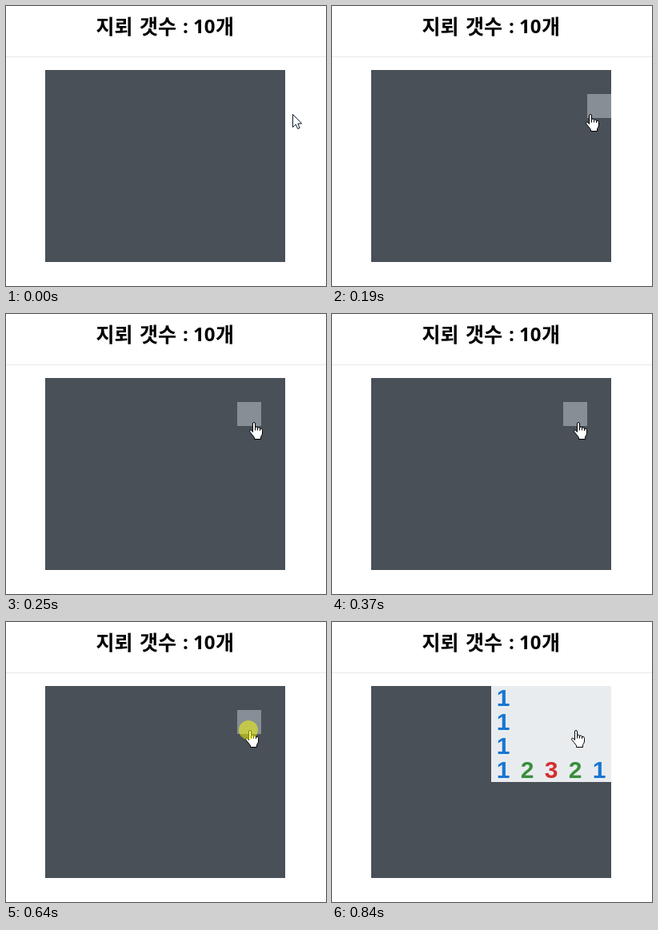
An HTML page with a canvas that plays this animation: 400x350 px, repeating every 1.1 s.

```html
<!DOCTYPE html>
<html lang="ko">
<head>
<meta charset="utf-8">
<style>
  html, body { margin: 0; width: 100%; height: 100%; overflow: hidden; background: #fff; }
  canvas { display: block; }
</style>
</head>
<body>
<canvas id="stage" width="400" height="350"></canvas>
<script>
const ctx = document.getElementById('stage').getContext('2d');
const LOOP = 1100, CELL = 30, LEFT = 49, TOP = 80, COLS = 10, ROWS = 8;
const PRESS = 640, RELEASE = 790, REVEAL = 840;

// [start time, pointer x]
const moves = [[0, 358], [110, 354], [130, 346], [160, 334], [190, 322],
               [220, 314], [250, 309], [370, 307], [430, 305], [490, 304]];
const numberColors = ['', '#1976d2', '#388e3c', '#d32f2f'];

const arrow = new Path2D('M.5 .5V16.5L4.2 13L6.7 18.5L9.2 17.4L6.8 12H11.7Z');
const hand = new Path2D('M4.5 12.5V2Q4.5 .5 6 .5T7.5 2V6.5Q9.8 5.2 10.5 7.2' +
  'Q12.8 6.2 13.5 8.2Q16.5 7.6 16.5 10.5V14Q16.5 16 14.5 18.5V21.5H6.5V19.5' +
  'L3.5 15.5L1 12.5Q0 10.5 1.5 10Q3 9.8 4.5 12.5Z');
const knuckles = new Path2D('M7.5 6.5V10.5M10.5 7.2V10.5M13.5 8.2V11');

function rect(color, x, y, w, h) {
  ctx.fillStyle = color;
  ctx.fillRect(x, y, w, h);
}

function cells(color, col, row, cols = 1, rows = 1) {
  rect(color, LEFT + col * CELL, TOP + row * CELL, cols * CELL, rows * CELL);
}

function text(value, x, y, font, color = '#000') {
  ctx.font = font;
  ctx.fillStyle = color;
  ctx.fillText(value, x, y);
}

function title() {
  const hangul = 'bold 25px "Noto Sans CJK KR", "Noto Sans CJK", sans-serif';
  const latin = 'bold 24px "Open Sans", sans-serif';
  ctx.textAlign = 'left';
  text('지뢰', 112.5, 35, hangul);
  text('갯수', 167, 35, hangul);
  text(':', 221, 34, latin);
  text('10', 234, 34, latin);
  text('개', 262, 35, hangul);
}

function number(value, col, row) {
  ctx.textAlign = 'center';
  text(value, LEFT + (col + .5) * CELL, TOP + row * CELL + 25,
    'bold 30px "Liberation Sans", Arial, sans-serif', numberColors[value]);
}

function revealed() {
  cells('#e9ecef', 5, 0, 5, 4);
  for (let row = 0; row < 3; row++) number(1, 5, row);
  [1, 2, 3, 2, 1].forEach((value, i) => number(value, 5 + i, 3));
}

function pointer(x, overBoard) {
  ctx.save();
  ctx.translate(overBoard ? x - 5 : x, 135);
  ctx.lineWidth = 1;
  ctx.lineJoin = 'round';
  ctx.strokeStyle = overBoard ? '#000' : '#0b1a30';
  ctx.fillStyle = '#fff';
  const shape = overBoard ? hand : arrow;
  ctx.fill(shape);
  ctx.stroke(shape);
  if (overBoard) ctx.stroke(knuckles);
  ctx.restore();
}

function draw(t) {
  rect('#fff', 0, 0, 400, 350);
  title();
  rect('#e9e9e9', 0, 63, 400, 1);
  cells('#495057', 0, 0, COLS, ROWS);

  const x = moves.filter(([start]) => start <= t).pop()[1];
  const overBoard = x < LEFT + COLS * CELL;
  if (t >= REVEAL) revealed();
  else if (overBoard) cells('#868e96', Math.floor((x - LEFT) / CELL), 1);
  pointer(x, overBoard);

  if (t >= PRESS && t < RELEASE) {
    ctx.fillStyle = 'rgba(255, 255, 0, .5)';
    ctx.beginPath();
    ctx.arc(303, 135, 12, 0, 2 * Math.PI);
    ctx.fill();
  }
}

function frame() {
  draw(performance.now() % LOOP);
  requestAnimationFrame(frame);
}
frame();
</script>
</body>
</html>
```
